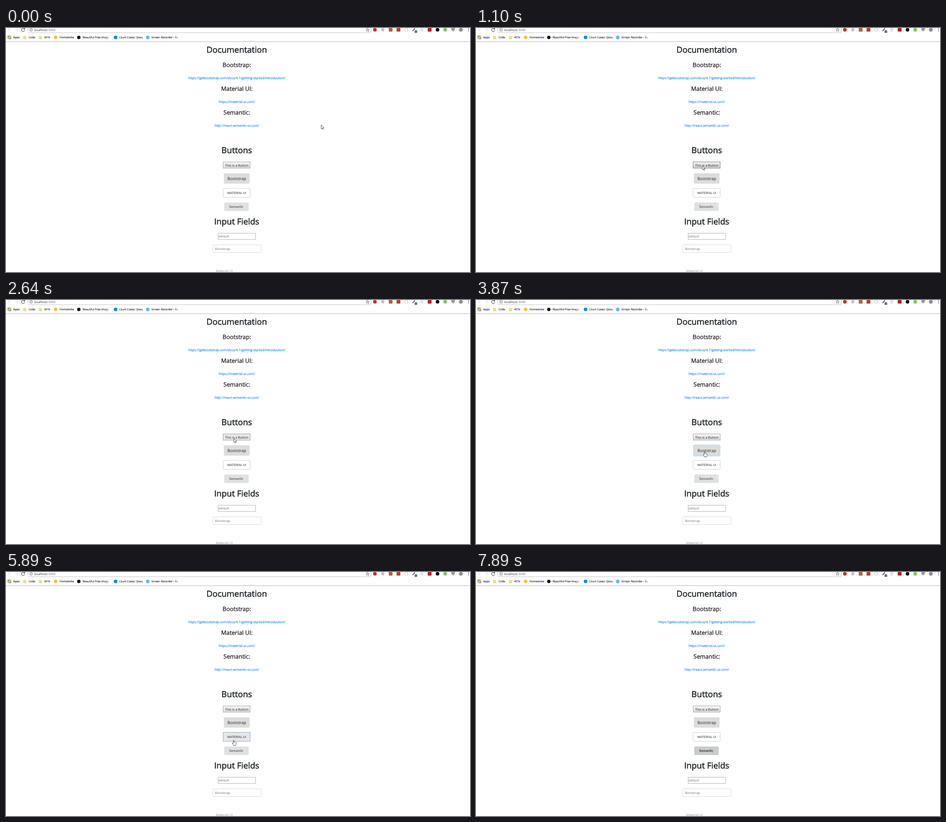
Write an HTML page that moves like this. It is 1029 px wide and 544 px high and loops after 8 s.

```html
<!DOCTYPE html>
<html lang="en">
<head>
<meta charset="utf-8">
<title>Component comparison</title>
<style>
html, body { margin: 0; width: 100%; height: 100%; overflow: hidden; background: #fff; }
svg { display: block; width: 1029px; height: 544px; text-rendering: geometricPrecision; cursor: default; }
text { font-family: "Open Sans", "Noto Sans", sans-serif; fill: #212529; }
.mid text, text.mid { text-anchor: middle; }
.h1 text { font-size: 18.5px; stroke: #212529; stroke-width: .55px; }
.h3 text { font-size: 13px; stroke: #212529; stroke-width: .38px; }
.link text { font-size: 7.25px; fill: #007bff; stroke: #007bff; stroke-width: .12px; }
.link text.over { fill: #0056b3; stroke: #0056b3; text-decoration: underline; }
.marks text { font-size: 6.15px; fill: #111; stroke: #111; stroke-width: .1px; }
.arial { font-family: "Liberation Sans", Arial, sans-serif; }
</style>
</head>
<body>
<svg viewBox="0 0 1029 544" xmlns="http://www.w3.org/2000/svg">
  <defs>
    <linearGradient id="face" x2="0" y2="1"><stop stop-color="#f5f5f5"/><stop offset="1" stop-color="#d9d9d9"/></linearGradient>
    <linearGradient id="faceOver" x2="0" y2="1"><stop stop-color="#f2f2f2"/><stop offset="1" stop-color="#cfcfcf"/></linearGradient>
    <linearGradient id="fade"><stop stop-color="#fff" stop-opacity="0"/><stop offset="1" stop-color="#fff"/></linearGradient>
  </defs>

  <!-- toolbar -->
  <g fill="none">
    <path d="M12 4H4.5M8 .5L4.5 4L8 7.5M19 4H26.5M23 .5L26.5 4L23 7.5" stroke="#ddd"/>
    <path d="M40.8 2.2A3.5 3.5 0 1 0 41.4 5M41.5 0V2.8H38.7" stroke="#444" stroke-width="1.1"/>
    <path d="M48.5 0V8Q48.5 10.5 51 10.5H807Q809.5 10.5 809.5 8V0" stroke="#c4c4c4"/>
    <circle cx="55.5" cy="4" r="3.3" stroke="#555" stroke-width=".8"/>
    <path d="M55.5 3.5V6M55.5 1.9V2.7" stroke="#555" stroke-width=".9"/>
    <path d="M802 .3L803 2.9L805.7 3L803.6 4.7L804.4 7.4L802 5.9L799.6 7.4L800.4 4.7L798.3 3L801 2.9Z" stroke="#555" stroke-width=".8"/>
  </g>
  <text x="62.5" y="6.5" font-size="7">localhost<tspan fill="#666">:3000</tspan></text>
  <g id="tools"></g>

  <!-- bookmarks -->
  <g id="apps"></g>
  <g fill="#f8d979">
    <path id="folder" d="M38 17.5H41L42 18.5H45V25H38Z"/>
    <use href="#folder" x="35"/>
    <circle cx="110" cy="21" r="3.8" fill="#f5c21b"/>
    <circle cx="161.5" cy="21" r="3.8" fill="#111"/>
    <circle cx="243" cy="21" r="4" fill="#1291c4"/>
    <circle cx="314.3" cy="21" r="4.2" fill="#6cbbe9"/>
  </g>
  <g class="marks">
    <text x="16" y="23.3">Apps</text>
    <text x="50" y="23.3">Code</text>
    <text x="84.5" y="23.3">401k</text>
    <text x="118.5" y="23.3">Homestoke</text>
    <text x="170" y="23.3">Beautiful Free Image</text>
    <text x="251" y="23.3">Court Cases: Qozu</text>
    <text x="322.5" y="23.3">Screen Recorder - Re</text>
  </g>
  <rect x="220" y="15" width="12" height="12" fill="url(#fade)"/>
  <rect x="373" y="15" width="12" height="12" fill="url(#fade)"/>
  <rect y="30" width="1029" height="1" fill="#b6b6b6"/>

  <!-- page -->
  <g class="mid h1">
    <text x="511.7" y="55">Documentation</text>
    <text x="511.7" y="279">Buttons</text>
    <text x="511.7" y="438">Input Fields</text>
  </g>
  <g class="mid h3">
    <text x="511.9" y="87.3">Bootstrap:</text>
    <text x="511.9" y="140.2">Material UI:</text>
    <text x="511.9" y="193.2">Semantic:</text>
  </g>
  <g class="mid link">
    <text x="511.8" y="113.5">https://getbootstrap.com/docs/4.1/getting-started/introduction/</text>
    <text id="muiLink" x="511.8" y="166.5">https://material-ui.com/</text>
    <text id="semLink" x="511.8" y="219.5">http://react.semantic-ui.com/</text>
  </g>

  <rect id="plain" x="481.5" y="298.5" width="60" height="14"/>
  <text class="mid" x="511.8" y="308.6" font-size="7.25">This is a Button</text>

  <rect id="ring" x="481.7" y="322.5" width="60.2" height="26" rx="3.5" fill="#b9daf5"/>
  <rect x="483.2" y="324" width="57" height="23" rx="2.3" fill="#dcdcdc"/>
  <text class="mid" x="511.7" y="339.3" font-size="9.05">Bootstrap</text>

  <rect id="mui" x="481.5" y="357.5" width="60" height="20" rx="2" stroke="#d0d0d0"/>
  <rect id="outline" x="481.5" y="357.5" width="60" height="20" fill="none" stroke="#8aaad6"/>
  <text class="mid arial" x="511.8" y="369.8" font-size="6.75">MATERIAL UI</text>

  <rect id="sem" x="484" y="389" width="54" height="19" rx="2"/>
  <text id="semText" class="mid" x="510.7" y="401.2" font-size="7.6" font-weight="700" style="font-family:Lato,sans-serif">Semantic</text>

  <g fill="#fff">
    <rect x="470.5" y="457.5" width="83" height="14" stroke="#b4b4b4"/>
    <rect x="458.5" y="483.5" width="107" height="17" rx="2" stroke="#d8dce0"/>
  </g>
  <text x="471.3" y="467" font-size="7.15" style="fill:#757575">default</text>
  <text x="463.8" y="494.7" font-size="7.2" style="fill:#6c757d">Bootstrap</text>
  <text class="arial" x="465.5" y="544" font-size="7.72" style="fill:#aaa">Material UI</text>

  <!-- pointer -->
  <g id="pointer" stroke="#222" stroke-width=".75" stroke-linejoin="round" fill="#fff">
    <path id="arrow" d="M0 0V9L2.1 7.1L3.5 10.2L4.9 9.6L3.5 6.5H6.2Z"/>
    <path id="hand" d="M-.9 .7Q0 -.4 .9 .7V4Q1.8 3.4 2.6 4.4Q3.5 3.9 4.2 4.9Q5.3 4.6 5.5 5.8V8.5Q5.4 9.6 4.6 10.4V11.8H-.6V10.6L-3 7.3Q-3.2 6 -1.8 6.2L-.9 7.2Z"/>
    <path id="beam" d="M-1.6 -4.3H1.6M0 -4.3V4.3M-1.6 4.3H1.6" stroke="#555" fill="none"/>
  </g>
</svg>
<script>
const $ = id => document.getElementById(id);
const set = (id, attrs) => { for (const k in attrs) $(id).setAttribute(k, attrs[k]); };
const clamp = v => Math.max(0, Math.min(1, v));

// app grid and extension icons
const rows = ['#db4437', '#0f9d58', '#f4b400', '#4285f4'];
for (let i = 0; i < 9; i++) {
  const col = i % 3, row = Math.floor(i / 3);
  $('apps').innerHTML += `<rect x="${3.5 + col * 2.8}" y="${17 + row * 2.8}" width="2.2" height="2.2" fill="${rows[(col + row) % 4]}"/>`;
}

const dot = (x, fill, r = 4) => `<circle cx="${x}" cy="4" r="${r}" fill="${fill}"/>`;
const box = (x, fill) => `<rect x="${x - 4.2}" y="0" width="8.4" height="8" rx="1" fill="${fill}"/>`;
$('tools').innerHTML =
  dot(818, '#d8281e') + dot(835.5, '#c4c4c4', 3.7) + box(853, '#b5613f') + box(870.3, '#c0392b') +
  '<circle cx="887.5" cy="4" r="3.6" fill="none" stroke="#bbb"/>' +
  '<path d="M901.5 6.5L907 1" stroke="#555" stroke-width="2"/><rect x="906" y="5" width="6" height="6" rx="1" fill="#777"/>' +
  dot(922, '#e4e4e4') + box(939.5, '#c4171d') + dot(957, '#111') + dot(974, '#7cc55a') +
  '<path d="M987.5 0H995.5V4L991.5 8L987.5 4Z" fill="#999"/>' + dot(1008.8, '#8c8c8c', 4.2) +
  [1, 4, 7].map(y => `<circle cx="1025.5" cy="${y}" r=".9" fill="#555"/>`).join('');

// time, x, y of the pointer tip
const track = [
  [0, 699, 216], [70, 699, 216], [300, 610, 176], [420, 548, 165], [500, 530, 180], [640, 515, 217],
  [760, 507, 250], [890, 504, 277], [950, 503, 284], [1100, 502, 307], [1180, 503, 312], [1340, 503, 312],
  [1600, 505.5, 308.5], [2900, 505.5, 308.5], [3190, 507, 338], [3870, 507, 338], [4050, 507, 341],
  [4350, 507, 341], [4730, 505.5, 372], [4860, 505.5, 372], [4880, 506.5, 368], [5600, 506.5, 368],
  [5890, 505, 375], [6180, 505, 375], [6730, 499, 386], [6990, 503, 402.5], [7290, 502, 402.5],
  [7640, 502, 402.5], [7890, 544, 429], [8000, 544, 429]
];

// left, top, right, bottom
const zones = {
  muiLink: [472, 159, 552, 169], semLink: [463, 212, 561, 222], plain: [481, 298, 542, 313],
  boot: [483, 324, 540, 347], mui: [481, 357, 542, 378], sem: [484, 389, 538, 408],
  buttonsTitle: [479, 262, 545, 285], inputsTitle: [462, 419, 562, 444]
};
const kinds = { plain: 'arrow', buttonsTitle: 'beam', inputsTitle: 'beam' };

const presses = [[1660, 1840], [2190, 2400], [2640, 2770]];

function pointerAt(t) {
  const i = track.findIndex(k => k[0] > t);
  const [a, b] = [track[i - 1], track[i]];
  const p = (t - a[0]) / (b[0] - a[0]);
  return [a[1] + (b[1] - a[1]) * p, a[2] + (b[2] - a[2]) * p];
}

function draw(t) {
  const [x, y] = pointerAt(t);
  const over = Object.keys(zones).find(k => {
    const [l, top, r, b] = zones[k];
    return x >= l && x <= r && y >= top && y <= b;
  });
  const kind = over ? kinds[over] || 'hand' : 'arrow';
  for (const k of ['arrow', 'hand', 'beam']) set(k, { visibility: k === kind ? 'visible' : 'hidden' });
  set('pointer', { transform: `translate(${x} ${y})` });

  for (const id of ['muiLink', 'semLink']) $(id).classList.toggle('over', over === id);

  const down = presses.some(([a, b]) => t >= a && t < b);
  const hot = over === 'plain';
  set('plain', {
    fill: down ? '#e6e6e6' : hot ? 'url(#faceOver)' : 'url(#face)',
    stroke: down ? '#a4a4a4' : hot ? '#808080' : '#acacac'
  });

  set('ring', { opacity: clamp((t - 3460) / 120) * clamp((5460 - t) / 150) });

  const grey = t < 5310 ? 0 : clamp((7180 - t) / 150);
  const shade = Math.round(255 - 24 * grey);
  set('mui', { fill: `rgb(${shade},${shade},${shade})` });
  set('outline', { visibility: t >= 5310 && t < 7030 ? 'visible' : 'hidden' });

  const dark = over === 'sem' || t >= 7030;
  set('sem', { fill: dark ? '#cacbcd' : '#e0e1e2' });
  $('semText').style.fill = t >= 7430 ? '#333' : dark ? '#444' : '#666';
}

const start = performance.now();
function tick() {
  draw((performance.now() - start) % 8000);
  requestAnimationFrame(tick);
}
tick();
</script>
</body>
</html>
```
